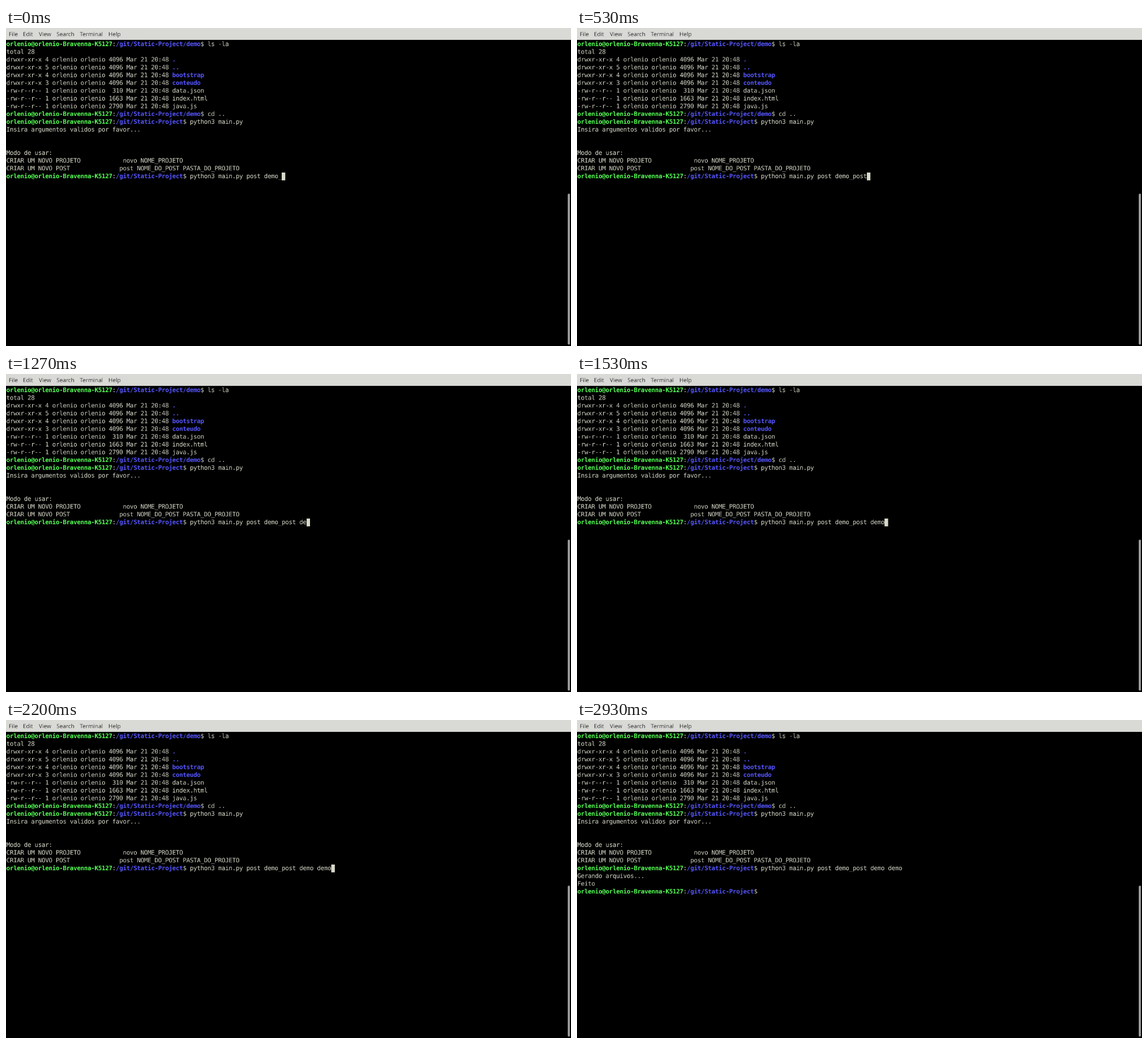
An HTML page that plays this animation: 998 px wide and 561 px high, repeating every 2.99 s.

```html
<!DOCTYPE html>
<html lang="pt">
<head>
<meta charset="utf-8">
<title>Terminal</title>
<style>
  html, body { margin: 0; width: 100%; height: 100%; overflow: hidden; background: #000; }
  /* A 1600 x 900 screen, drawn at full size and scaled down as one layer */
  #stage {
    position: absolute; width: 1600px; height: 900px; background: #000;
    transform: scale(.62375, .62333); transform-origin: 0 0; will-change: transform;
    text-rendering: geometricPrecision;
  }
  #menu {
    position: absolute; width: 1600px; height: 34px;
    background: #d9d9d6; box-shadow: inset 0 -1px #b8b8b5;
    font: 16px/34px "Noto Sans", "Open Sans", sans-serif; color: #3c3c3c;
  }
  #menu span { position: absolute; top: 0; }
  /* 13pt type on a terminal grid of 10 x 22 cells */
  #term {
    position: absolute; left: 1px; top: 35px; margin: 0;
    font: 13pt/22px "DejaVu Sans Mono", monospace; color: #d6d6c8;
    letter-spacing: calc(10px - .60205em); font-variant-ligatures: none;
  }
  b { color: #5555ff; }
  b.user { color: #55ff55; }
  #cursor {
    display: inline-block; width: 10px; height: 22px;
    vertical-align: top; background: #d9d9cb;
  }
  #bar {
    position: absolute; left: 1591px; top: 469px; width: 6px; height: 427px;
    border-radius: 3px; background: #a2a2a0;
  }
</style>
</head>
<body>
<div id="stage">
  <div id="menu"></div>
  <pre id="term"></pre>
  <div id="bar"></div>
</div>
<script>
const LOOP = 2990, ENTER = 2330, BLINK_OFF = 2930;
const user = 'orlenio', host = user + '-Bravenna-K5127';
const $ = id => document.getElementById(id);

const labels = { File: 8, Edit: 48, View: 93, Search: 143, Terminal: 209, Help: 290 };
$('menu').innerHTML = Object.entries(labels)
  .map(([name, x]) => `<span style="left:${x}px">${name}</span>`).join('');

const prompt = (dir = '') =>
  `<b class="user">${user}@${host}</b>:<b>/git/Static-Project${dir}</b>$ `;
const entry = (mode, links, size, name) =>
  `${mode} ${links} ${user} ${user} ${String(size).padStart(4)} Mar 21 20:48 ${name}`;
const folder = (links, name) => entry('drwxr-xr-x', links, 4096, `<b>${name}</b>`);
const file = (size, name) => entry('-rw-r--r--', 1, size, name);

const history = [
  prompt('/demo') + 'ls -la',
  'total 28',
  folder(4, '.'),
  folder(5, '..'),
  folder(4, 'bootstrap'),
  folder(3, 'conteudo'),
  file(310, 'data.json'),
  file(1663, 'index.html'),
  file(2790, 'java.js'),
  prompt('/demo') + 'cd ..',
  prompt() + 'python3 main.py',
  'Insira argumentos validos por favor...',
  '', '',
  'Modo de usar:',
  'CRIAR UM NOVO PROJETO'.padEnd(33) + 'novo NOME_PROJETO',
  'CRIAR UM NOVO POST'.padEnd(32) + 'post NOME_DO_POST PASTA_DO_PROJETO',
  prompt() + 'python3 main.py post demo_'
].join('\n');

// Remaining characters and the moment each key is pressed
const typed = 'post demo demo';
const keys = [130, 270, 330, 470, 800, 1130, 1200, 1330, 1470, 1730, 1870, 1930, 2070, 2130];
const output = '\nGerando arquivos...\nFeito\n' + prompt();

let shown = '';
function draw() {
  const t = performance.now() % LOOP;
  const count = keys.filter(k => k <= t).length;
  const html = history + typed.slice(0, count) + (t >= ENTER ? output : '') +
    (t < BLINK_OFF ? '<span id="cursor"></span>' : '');
  if (html !== shown) $('term').innerHTML = shown = html;
  requestAnimationFrame(draw);
}
draw();
</script>
</body>
</html>
```
